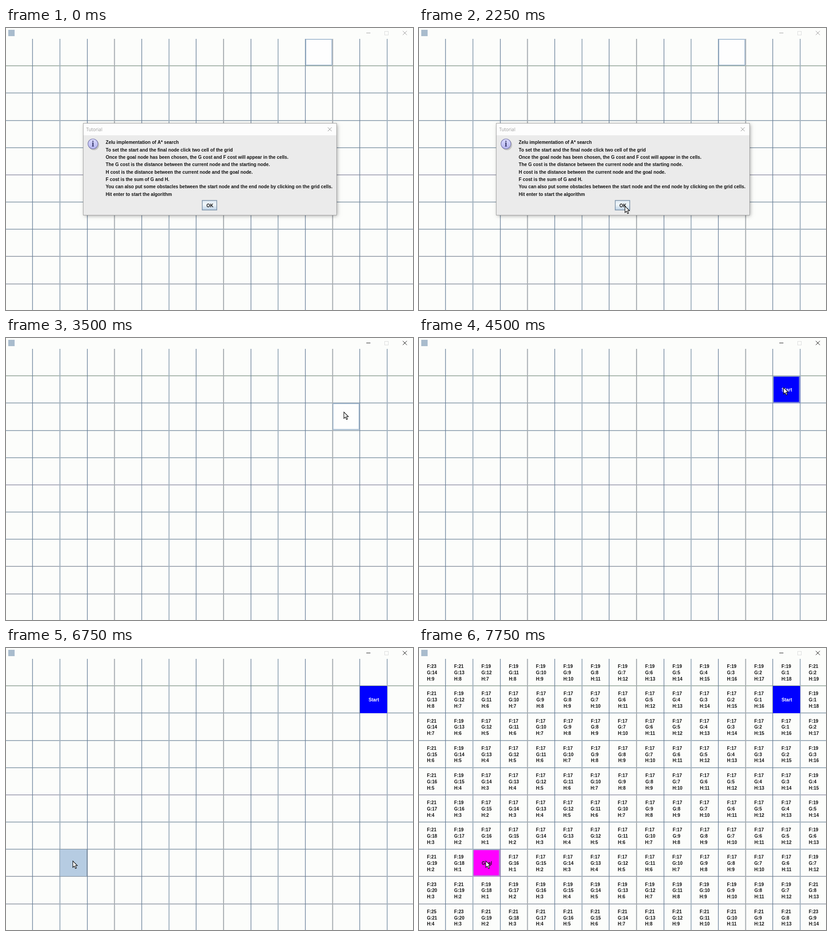
An HTML page with a canvas that plays this animation: 898x623 px, repeating every 8 s.

```html
<!DOCTYPE html>
<html lang="en">
<head>
<meta charset="utf-8">
<title>Path search</title>
<style>
html, body { margin: 0; width: 100%; height: 100%; overflow: hidden; background: #fcfdfb; }
canvas { display: block; }
</style>
</head>
<body>
<canvas id="stage" width="898" height="623"></canvas>
<script>
const ctx = document.getElementById('stage').getContext('2d');
const LOOP = 8000, STEP = 250;
const COLS = 15, ROWS = 10, PITCH = 60.17, LEFT = -1.95, TOP = 23.05;
const START = [13, 1], GOAL = [2, 7];
const BOLD = 'bold 10.2px "Liberation Sans", Arial, sans-serif';
const INK = '#111';
const CLOSE_AT = 2500, START_PRESS = 4250, START_SET = 4500, GOAL_PRESS = 6750, GOAL_SET = 7000;

// Pointer path: time, x, y
const PATH = [
  [750, 760, 470], [1500, 454, 393], [2500, 454, 393], [3250, 745, 163], [3500, 745, 163],
  [3750, 804, 109], [4750, 804, 109], [5000, 630, 305], [5500, 198, 464],
  [5750, 147, 470], [8000, 147, 470]
];
const HELP = [
  'Zelu implementation of A* search',
  'To set the start and the final node click two cell of the grid',
  'Once the goal node has been chosen, the G cost and F cost will appear in the cells.',
  'The G cost is the distance between the current node and the starting node.',
  'H cost is the distance between the current node and the goal node.',
  'F cost is the sum of G and H.',
  'You can also put some obstacles between the start node and the end node by clicking on the grid cells.',
  'Hit enter to start the algorithm'
];

const cellX = c => Math.round(LEFT + c * PITCH);
const cellY = r => Math.round(TOP + r * PITCH);
const centerX = c => 28.7 + c * PITCH;
const same = (a, b) => a[0] === b[0] && a[1] === b[1];
const distance = (a, b) => Math.abs(a[0] - b[0]) + Math.abs(a[1] - b[1]);

function rect(x, y, w, h, fill) {
  ctx.fillStyle = fill;
  ctx.fillRect(x, y, w, h);
}

function frame(x, y, w, h, color, width = 1) {
  ctx.strokeStyle = color;
  ctx.lineWidth = width;
  ctx.strokeRect(x, y, w, h);
}

function text(str, x, y, color = INK, font = BOLD, align = 'left') {
  ctx.font = font;
  ctx.fillStyle = color;
  ctx.textAlign = align;
  ctx.fillText(str, x, y);
}

function cross(x, y, size, color) {
  ctx.strokeStyle = color;
  ctx.lineWidth = 1;
  ctx.beginPath();
  ctx.moveTo(x, y);
  ctx.lineTo(x + size, y + size);
  ctx.moveTo(x + size, y);
  ctx.lineTo(x, y + size);
  ctx.stroke();
}

function pointerAt(t) {
  const i = PATH.findIndex(p => p[0] > t);
  if (i < 1) return null;
  const [t0, x0, y0] = PATH[i - 1], [t1, x1, y1] = PATH[i];
  const k = (t - t0) / (t1 - t0);
  return [x0 + (x1 - x0) * k, y0 + (y1 - y0) * k];
}

function drawTitleBar(active) {
  const color = active ? '#111' : '#999';
  rect(5, 4, 14, 14, '#a9bccd');
  rect(795, 10.5, 9, 1, color);
  frame(835.5, 7.5, 8, 8, '#dcdcdc');
  cross(875.5, 6.5, 9, color);
}

function drawGrid() {
  for (let r = 1; r < ROWS; r++) {
    const color = r === 1 ? '#7c9184' : r === 5 ? '#84849c' : r > 7 ? '#7b8494' : '#71869a';
    rect(0, cellY(r) - 0.2, 898, 1.4, color);
  }
  for (let c = 1; c < COLS; c++) {
    if (c % 2) rect(cellX(c) - 0.2, 24, 1.4, 599, '#6a809a');
    else rect(LEFT + c * PITCH - 0.5, 24, 2.2, 599, c % 4 ? '#a2b2c0' : '#a8adb2');
  }
}

function drawHover([c, r]) {
  const x = cellX(c), y = cellY(r);
  rect(x + 1, y + 1, 59, 59, '#fefefe');
  frame(x + 1.5, y + 2, 57.5, 57, '#8faac6', 1.5);
}

function drawPressed([c, r]) {
  rect(cellX(c) + 1, cellY(r) + 1, 60, 60, '#b6cce2');
  frame(cellX(c) + 0.5, cellY(r) + 0.5, 60, 60, '#7a8a99');
}

function drawEnd([c, r], label, fill, ink, hovered) {
  const x = cellX(c), y = cellY(r);
  rect(x + 1, y + 1, 60, 60, fill);
  if (hovered) frame(x + 1.5, y + 1.5, 58, 58, '#9fb0c6', 2);
  text(label, centerX(c) + 0.6, 57.7 + r * PITCH, ink, BOLD, 'center');
}

function drawCosts() {
  ctx.font = BOLD;
  for (let c = 0; c < COLS; c++) for (let r = 0; r < ROWS; r++) {
    const cell = [c, r];
    if (same(cell, START) || same(cell, GOAL)) continue;
    const g = distance(cell, START), h = distance(cell, GOAL);
    const lines = ['F:' + (g + h), 'G:' + g, 'H:' + h];
    const width = Math.max(...lines.map(s => ctx.measureText(s).width));
    lines.forEach((s, i) => text(s, centerX(c) - width / 2, 44.3 + r * PITCH + i * 13.8));
  }
}

function drawInfoIcon() {
  const disc = (x, y, r, fill) => {
    ctx.fillStyle = fill;
    ctx.beginPath();
    ctx.arc(x, y, r, 0, 7);
    ctx.fill();
  };
  disc(194, 258.5, 11.5, '#c4c4c4');
  disc(191.8, 256, 11.5, '#7474a8');
  const shade = ctx.createLinearGradient(0, 245, 0, 267);
  shade.addColorStop(0, '#dcdcff');
  shade.addColorStop(1, '#b4b4ee');
  disc(191.8, 256, 10.4, shade);
  text('i', 191.8, 262, '#38386a', 'bold 18px "Liberation Serif", serif', 'center');
}

function drawDialog() {
  ctx.save();
  ctx.shadowColor = 'rgba(0,0,0,.35)';
  ctx.shadowBlur = 8;
  ctx.shadowOffsetX = ctx.shadowOffsetY = 2;
  rect(171, 211, 558, 202, '#ebebeb');
  ctx.restore();
  rect(171, 211, 558, 26, '#fdfdfd');
  frame(170.5, 210.5, 559, 203, '#a0a0a0');
  text('Tutorial', 177, 228, '#999', '10px "Open Sans", sans-serif');
  cross(710, 219.5, 8.5, '#888');
  drawInfoIcon();
  HELP.forEach((line, i) => text(line, 220, 256.2 + i * 16.35));

  const face = ctx.createLinearGradient(0, 381, 0, 403);
  face.addColorStop(0, '#dce8f3');
  face.addColorStop(0.4, '#f2f7fa');
  face.addColorStop(1, '#b8cfe5');
  rect(432, 380, 34, 23, face);
  frame(433, 381, 32, 21, '#8195a9', 1.6);
  text('OK', 450, 396, INK, BOLD, 'center');
}

function drawPointer([x, y]) {
  ctx.save();
  ctx.translate(x + 0.5, y + 0.5);
  const arrow = new Path2D('M0 0V14.2L3.3 11.2L5.7 16.6L8 15.6L5.7 10.3H10Z');
  ctx.fillStyle = '#fff';
  ctx.fill(arrow);
  ctx.strokeStyle = '#000';
  ctx.lineWidth = 1.1;
  ctx.stroke(arrow);
  ctx.restore();
}

function draw(t) {
  const open = t < CLOSE_AT;
  const pointer = pointerAt(t);
  const hover = open ? [11, 0]
    : [Math.floor((pointer[0] - LEFT) / PITCH), Math.floor((pointer[1] - TOP) / PITCH)];

  rect(0, 0, 898, 623, '#fcfdfb');
  drawTitleBar(!open);
  drawGrid();
  if (t === START_PRESS || t === GOAL_PRESS) drawPressed(hover);
  else drawHover(hover);
  if (t >= START_SET) drawEnd(START, 'Start', '#0000ff', '#fff', same(hover, START));
  if (t >= GOAL_SET) {
    drawCosts();
    drawEnd(GOAL, 'Goal', '#ff00ff', INK, same(hover, GOAL));
  }
  if (open) drawDialog();
  if (pointer) drawPointer(pointer);
}

const begin = performance.now();
function tick() {
  const t = (performance.now() - begin) % LOOP;
  draw(Math.floor(t / STEP) * STEP);
  requestAnimationFrame(tick);
}
tick();
</script>
</body>
</html>
```
